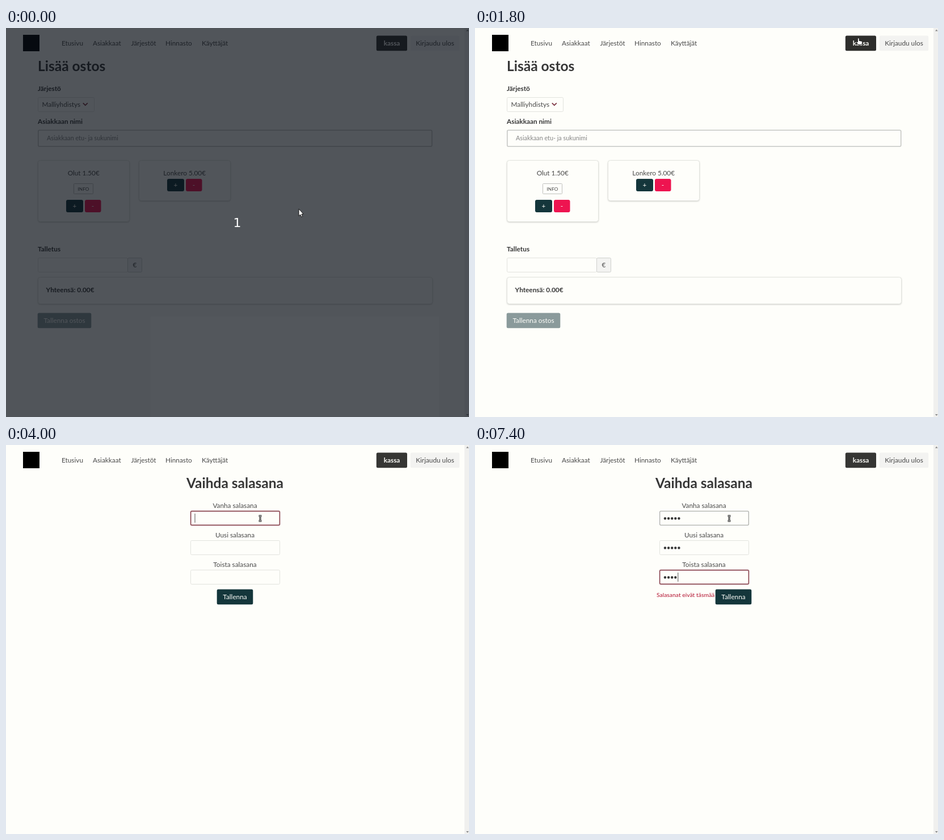
Animation, 816 px wide and 686 px high, one loop 8000 ms. Source, as an HTML page:

```html
<!DOCTYPE html>
<html lang="fi">
<head>
<meta charset="utf-8">
<style>
html, body { margin: 0; width: 100%; height: 100%; overflow: hidden; background: #fefefa; }
svg { display: block; width: 816px; height: 686px; }
text { font: 11.8px Lato, "Open Sans", sans-serif; fill: #4a4a4a; }
.mid { text-anchor: middle; }
.bold { font-weight: 700; fill: #363636; }
.title { font-size: 24.5px; }
.white { fill: #fefefa; }
.small { font-size: 10.8px; fill: #858585; }
.error { font-size: 10.4px; fill: #b3122f; }
.info { font-size: 8.3px; }
.url { font: 10.8px "Open Sans", sans-serif; fill: #555; }
.count { font: 22px "DejaVu Sans", sans-serif; fill: #fff; }
.card { fill: #fefefa; stroke: #e3e4df; filter: drop-shadow(0 1px 1px #0a0a0a30); }
</style>
</head>
<body>
<svg viewBox="0 0 816 686">
  <g id="nav"></g>
  <g id="shop"></g>
  <g id="form"></g>
  <g id="status"></g>
  <g id="veil">
    <rect width="816" height="686" fill="rgb(9,15,24)" fill-opacity=".7"/>
    <text class="mid count" x="407.5" y="351">1</text>
  </g>
  <g id="cursor">
    <path id="arrow" d="M0 0V12.5L2.8 10 4.6 14.2 6.7 13.3 4.9 9.2H8.4Z" fill="#fff" stroke="#111"/>
    <path id="hand" d="M-1.5 1a1.3 1.3 0 0 1 2.6 0v3.4l4.2.8q1.4.3 1.2 1.8l-.7 4.5h-6l-3.5-4q-.9-1.3.5-1.4l1.7.8z" fill="#fff" stroke="#111" stroke-width=".8"/>
    <g id="beam" fill="none">
      <path d="M-2.4-4.5H2.4M-2.4 4.5H2.4M0-4.5V4.5" stroke="#222" stroke-width="3"/>
      <path d="M-2-4.5H2M-2 4.5H2M0-4.5V4.5" stroke="#ddd" stroke-width=".9"/>
    </g>
  </g>
</svg>
<script>
const $ = id => document.getElementById(id);
const DARK = '#14363b', PINK = '#ee1450', PALE = '#f3f3f1', LINE = '#e2e3de';

const text = (x, y, s, cls = '') => `<text x="${x}" y="${y}" class="${cls}">${s}</text>`;
const fill = (x, y, w, h, color, r = 3) =>
  `<rect x="${x}" y="${y}" width="${w}" height="${h}" rx="${r}" fill="${color}"/>`;
const box = (x, y, w, h, stroke = LINE, bg = '#fefefa', sw = 1, r = 2) =>
  `<rect x="${x + sw / 2}" y="${y + sw / 2}" width="${w - sw}" height="${h - sw}" rx="${r}" fill="${bg}" stroke="${stroke}" stroke-width="${sw}"/>`;
const card = (x, y, w, h) =>
  `<rect class="card" x="${x + .5}" y="${y + .5}" width="${w - 1}" height="${h - 1}" rx="4"/>`;
const button = (x, y, w, s, color = DARK) =>
  fill(x - .3, y - .4, w + .6, 26.6, color, 2.5) + text(x + w / 2, y + 17, s, 'mid white');
const plusMinus = (x, y) =>
  fill(x, y, 30, 22, DARK) + text(x + 15, y + 15, '+', 'mid white') +
  fill(x + 33, y, 28.5, 22, PINK) + text(x + 47, y + 15, '-', 'mid white');

$('nav').innerHTML =
  fill(30, 12, 29, 29, '#000', 0) +
  [[98, 'Etusivu'], [153, 'Asiakkaat'], [220.5, 'Järjestöt'], [281, 'Hinnasto'], [345, 'Käyttäjät']]
    .map(([x, s]) => text(x, 31, s)).join('') +
  `<rect id="user" x="652.8" y="13.6" width="54.2" height="26.6" rx="2.5"/>` +
  text(680, 31, 'kassa', 'mid bold white') +
  fill(712.8, 13.6, 86.4, 26.6, PALE, 2.5) + text(756, 31, 'Kirjaudu ulos', 'mid') +
  fill(808, 0, 8, 686, '#f0f0ee', 0) +
  '<path d="M811 5.5l2.3-3 2.3 3zM811 681l2.3 3 2.3-3z" fill="#888"/>';

$('shop').innerHTML =
  text(56, 76, 'Lisää ostos', 'bold title') +
  text(56, 111, 'Järjestö', 'bold') +
  box(56, 122, 100, 26) + text(63.5, 139, 'Malliyhdistys') +
  '<path d="M135.8 132.3l4 4 4-4" fill="none" stroke="#7c3442" stroke-width="1.8"/>' +
  text(56, 169, 'Asiakkaan nimi', 'bold') +
  box(56, 179.5, 695.5, 30, '#c6c8c5', '#fefefa', 1.6) +
  text(72, 198, 'Asiakkaan etu- ja sukunimi', 'small') +
  card(56, 233, 162, 109) + text(136.7, 260, 'Olut 1.50€', 'mid') +
  box(119, 274, 35, 19, '#bfc0bd', '#fefefa', 1, 1) + text(136.5, 287, 'INFO', 'mid info') +
  plusMinus(106, 303) +
  card(234, 233, 162, 72) + text(314.7, 260, 'Lonkero 5.00€', 'mid') +
  plusMinus(284, 266) +
  text(56, 394, 'Talletus', 'bold') +
  box(56, 405, 159, 26) + box(214, 405, 26, 26, '#cfd0cd', PALE) +
  text(227, 422, '€', 'mid') +
  card(56, 439, 696, 48) + text(70.5, 466, 'Yhteensä: 0.00€', 'bold') +
  button(56, 503, 94, 'Tallenna ostos', '#8a9a9b');

$('status').innerHTML =
  '<path d="M-1 687V671.5H268.5q3 0 3 3V687z" fill="#f1f1ed" stroke="#dcdcd8"/>' +
  text(3, 683.5, 'fee-list.herokuapp.com/profile', 'url');

// Each field: label, time of focus, times at which a character is typed
const fields = [
  ['Vanha salasana', 4000, [4100, 4300, 4400, 4600, 4900]],
  ['Uusi salasana', 4900, [5400, 5600, 5800, 6200, 6200]],
  ['Toista salasana', 6400, [6700, 7000, 7100, 7400]]
];

function drawField([label, start, keys], i, t, hover) {
  const y = 116 + 52 * i;
  const focused = t >= start && !(fields[i + 1] && t >= fields[i + 1][1]);
  const typed = keys.filter(k => t >= k).length;
  let out = text(403.5, y - 5, label, 'mid');
  if (focused) {
    out += box(324, y - 1, 160, 28, '#7c344233', 'none', 2, 3) +
      box(325, y, 158, 26, '#87404c', '#fefefa', 1.4);
  } else {
    out += box(325, y, 158, 26, hover ? '#adafad' : LINE, '#fefefa', hover ? 1.3 : 1);
  }
  for (let n = 0; n < typed; n++)
    out += `<circle cx="${335 + 6.1 * n}" cy="${y + 13.5}" r="2.2" fill="#363636"/>`;
  if (focused) out += fill(332.5 + 6.2 * typed, y + 5, 1, 16, '#555', 0);
  return out;
}

function drawForm(t, hover) {
  const wrong = t >= 6700;
  return text(403.5, 76, 'Vaihda salasana', 'mid bold title') +
    fields.map((f, i) => drawField(f, i, t, hover && i === 0)).join('') +
    (wrong ? text(320, 267.5, 'Salasanat eivät täsmää', 'error') : '') +
    button(wrong ? 424 : 372, 255, 63, 'Tallenna');
}

// Pointer legs: start time, number of 100 ms steps, end point
const legs = [[800, 4, 558, 188], [1300, 6, 676, 18], [2900, 2, 594, 61], [3200, 4, 448, 129.5]];

function pointerAt(t) {
  let x = 516, y = 319;
  for (const [start, steps, toX, toY] of legs) {
    if (t < start) break;
    const k = Math.min(1, (Math.floor((t - start) / 100) + 1) / steps);
    const e = k * k * (3 - 2 * k);
    x += (toX - x) * e;
    y += (toY - y) * e;
  }
  return [x, y];
}

const show = (id, on) => $(id).setAttribute('display', on ? 'inline' : 'none');

function frame(now) {
  const t = now % 8000;
  const [x, y] = pointerAt(t);
  const overUser = x > 653 && y < 40;
  const inField = t > 3000 && x < 483 && y > 116;
  const onForm = t >= 2200;

  show('veil', t < 500);
  show('shop', !onForm);
  show('form', onForm);
  show('status', t >= 2000 && t < 3200);
  show('arrow', !overUser && !inField);
  show('hand', overUser);
  show('beam', inField);
  $('user').setAttribute('fill', overUser ? '#2e2e2c' : '#363634');
  $('cursor').setAttribute('transform', `translate(${x} ${y})`);
  if (onForm) $('form').innerHTML = drawForm(t, inField);
  requestAnimationFrame(frame);
}
requestAnimationFrame(frame);
</script>
</body>
</html>
```
